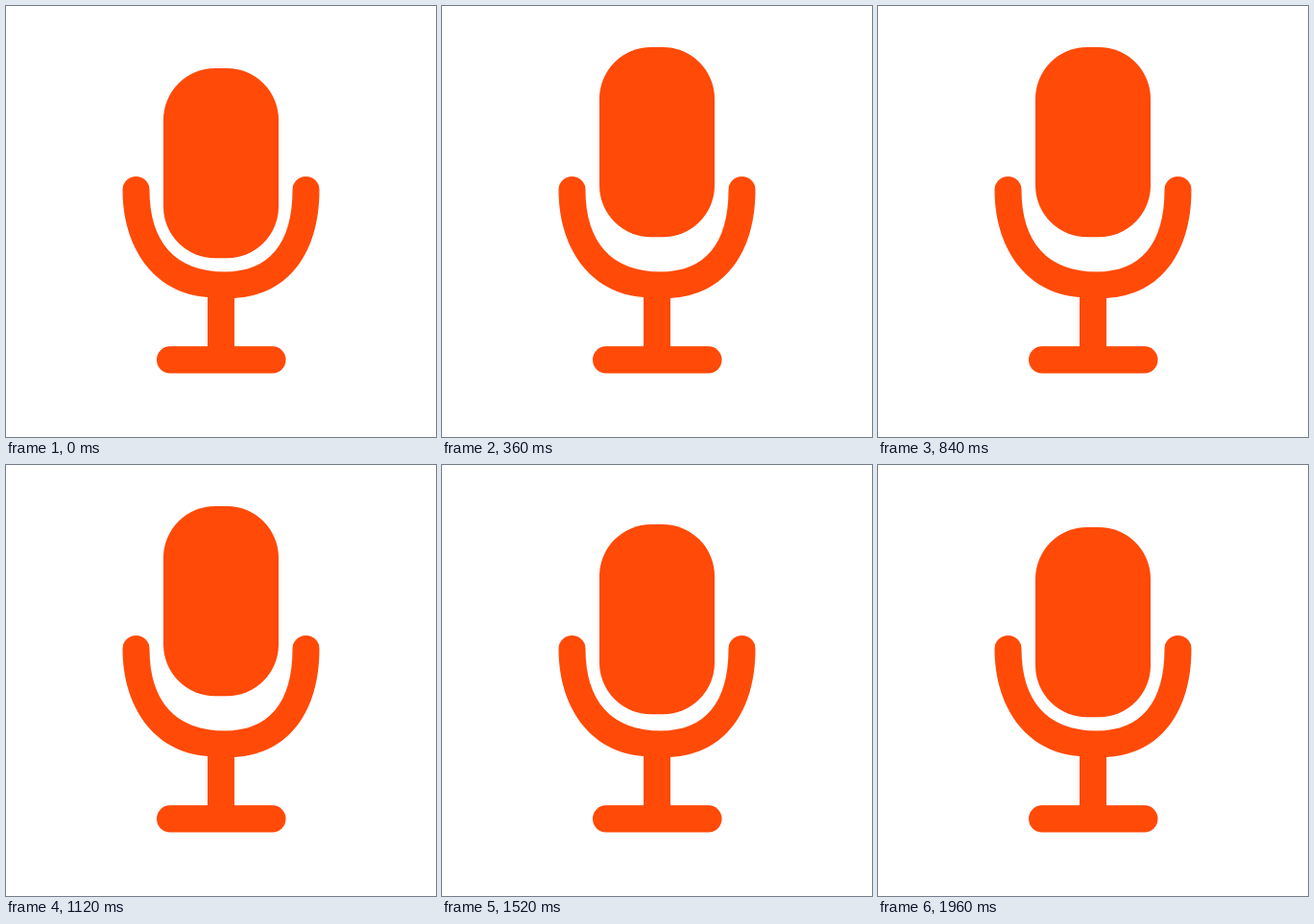
An HTML page with a canvas for the animation above (2 s loop, 448x450 px).

```html
<!DOCTYPE html>
<html lang="en">
<head>
<meta charset="utf-8">
<title>Microphone</title>
<style>
  html, body { margin: 0; width: 100%; height: 100%; overflow: hidden; background: #fff; }
  canvas { display: block; }
</style>
</head>
<body>
<canvas id="stage" width="448" height="450"></canvas>
<script>
const ctx = document.getElementById('stage').getContext('2d');
const STEP = 40;          // ms per drawn step
const STEPS = 25;         // two bounces, then a one-step rest
const BOUNCE = 12;        // steps per bounce

function pill(x, y, w, h, r) {
  ctx.beginPath();
  ctx.roundRect(x, y, w, h, r);
  ctx.fill();
}

function cradle() {
  ctx.beginPath();
  ctx.moveTo(121.5, 192);
  ctx.arc(135.5, 192, 14, Math.PI, 0);
  ctx.bezierCurveTo(149.5, 246, 176, 277.5, 228, 277.5);
  ctx.bezierCurveTo(274, 277.5, 298.5, 248, 298.5, 192);
  ctx.arc(312.5, 192, 14, Math.PI, 0);
  ctx.bezierCurveTo(326.5, 257, 295, 302, 238, 305);
  ctx.lineTo(210, 304);
  ctx.bezierCurveTo(153, 300, 121.5, 251, 121.5, 192);
  ctx.fill();
}

function draw(now) {
  const step = Math.floor(now / STEP) % STEPS;
  const top = 43 + 22 * Math.cos(2 * Math.PI * step / BOUNCE);
  ctx.fillStyle = '#fff';
  ctx.fillRect(0, 0, 448, 450);
  ctx.fillStyle = '#ff4a08';
  cradle();
  ctx.fillRect(210, 300, 28, 60);
  pill(157, 355.3, 134.5, 28.2, 14);
  pill(164, top, 120, 198.3, 54);
}

const start = performance.now();
function tick() {
  draw(performance.now() - start);
  requestAnimationFrame(tick);
}
tick();
</script>
</body>
</html>
```
